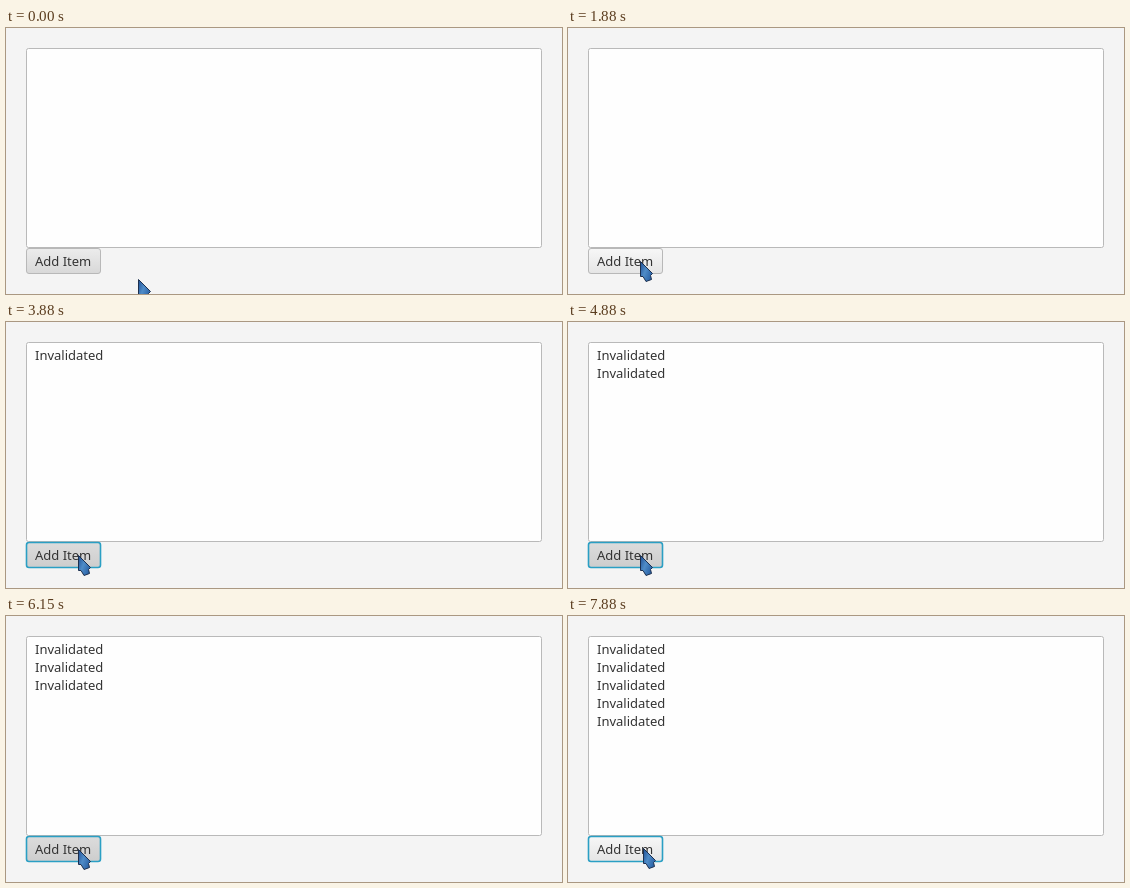
These frames come from a looping animation (556 by 266 pixels, 8000 ms). An HTML page:

```html
<!DOCTYPE html>
<html lang="en">
<head>
<meta charset="utf-8">
<title>Add Item</title>
<style>
  html, body { margin: 0; width: 100%; height: 100%; overflow: hidden; background: #f4f4f4; }
  svg { display: block; }
  text { font: 13px "Noto Sans", sans-serif; fill: #333; }
</style>
</head>
<body>
<svg width="556" height="266" viewBox="0 0 556 266">
  <defs>
    <linearGradient id="normal" x2="0" y2="1">
      <stop stop-color="#ececec"/><stop offset="1" stop-color="#d8d8d8"/>
    </linearGradient>
    <linearGradient id="hover" x2="0" y2="1">
      <stop stop-color="#f7f7f7"/><stop offset="1" stop-color="#e5e5e5"/>
    </linearGradient>
    <linearGradient id="pressed" x2="0" y2="1">
      <stop stop-color="#dcdcdc"/><stop offset="1" stop-color="#cdcdcd"/>
    </linearGradient>
    <linearGradient id="arrow" x2="1" y2=".6">
      <stop stop-color="#1f4f94"/><stop offset=".5" stop-color="#4f8cc8"/><stop offset="1" stop-color="#2a62a6"/>
    </linearGradient>
  </defs>
  <rect x="20.5" y="20.5" width="515" height="199" rx="2" fill="#fefefe" stroke="#b9b9b9"/>
  <g id="items"></g>
  <rect id="button" x="20.5" y="220.5" width="74" height="25" rx="2.5"/>
  <text x="29" y="238">Add Item</text>
  <path id="cursor" d="M.5 .5V15.5H3L6 20.5 11.5 18.5 10.5 14.5 12.5 12.5Z"
        fill="url(#arrow)" stroke="#1c2f4e" stroke-linejoin="round"/>
</svg>
<script>
const LOOP = 8000, ROW = 18;
const button = document.getElementById("button");
const cursor = document.getElementById("cursor");

// When each row appears, and when the mouse button goes down and up.
const added = [2630, 3930, 5100, 6280, 7700];
const presses = [[2500, 2630], [3880, 3930], [4880, 5100], [6150, 6280], [6880, 7700]];
const path = [[0, 132, 251], [880, 120, 247], [1450, 99, 241], [1880, 72, 233], [7880, 75, 232]];

const rows = added.map((_, i) => {
  const row = document.createElementNS("http://www.w3.org/2000/svg", "text");
  row.setAttribute("x", 29);
  row.setAttribute("y", 38 + i * ROW);
  row.textContent = "Invalidated";
  return document.getElementById("items").appendChild(row);
});

function draw() {
  const t = performance.now() % LOOP;
  const focused = t >= presses[0][0];
  const pressed = presses.some(([down, up]) => t >= down && t < up);
  const state = pressed ? "pressed" : t >= 1880 ? "hover" : "normal";
  const [, x, y] = path.findLast(([start]) => t >= start);

  button.setAttribute("fill", `url(#${state})`);
  button.setAttribute("stroke", focused ? "#2a9fc4" : "#b8b8b8");
  button.setAttribute("stroke-width", focused ? 1.6 : 1);
  cursor.setAttribute("transform", `translate(${x} ${y})`);
  rows.forEach((row, i) => row.setAttribute("visibility", t >= added[i] ? "visible" : "hidden"));
  requestAnimationFrame(draw);
}
draw();
</script>
</body>
</html>
```
